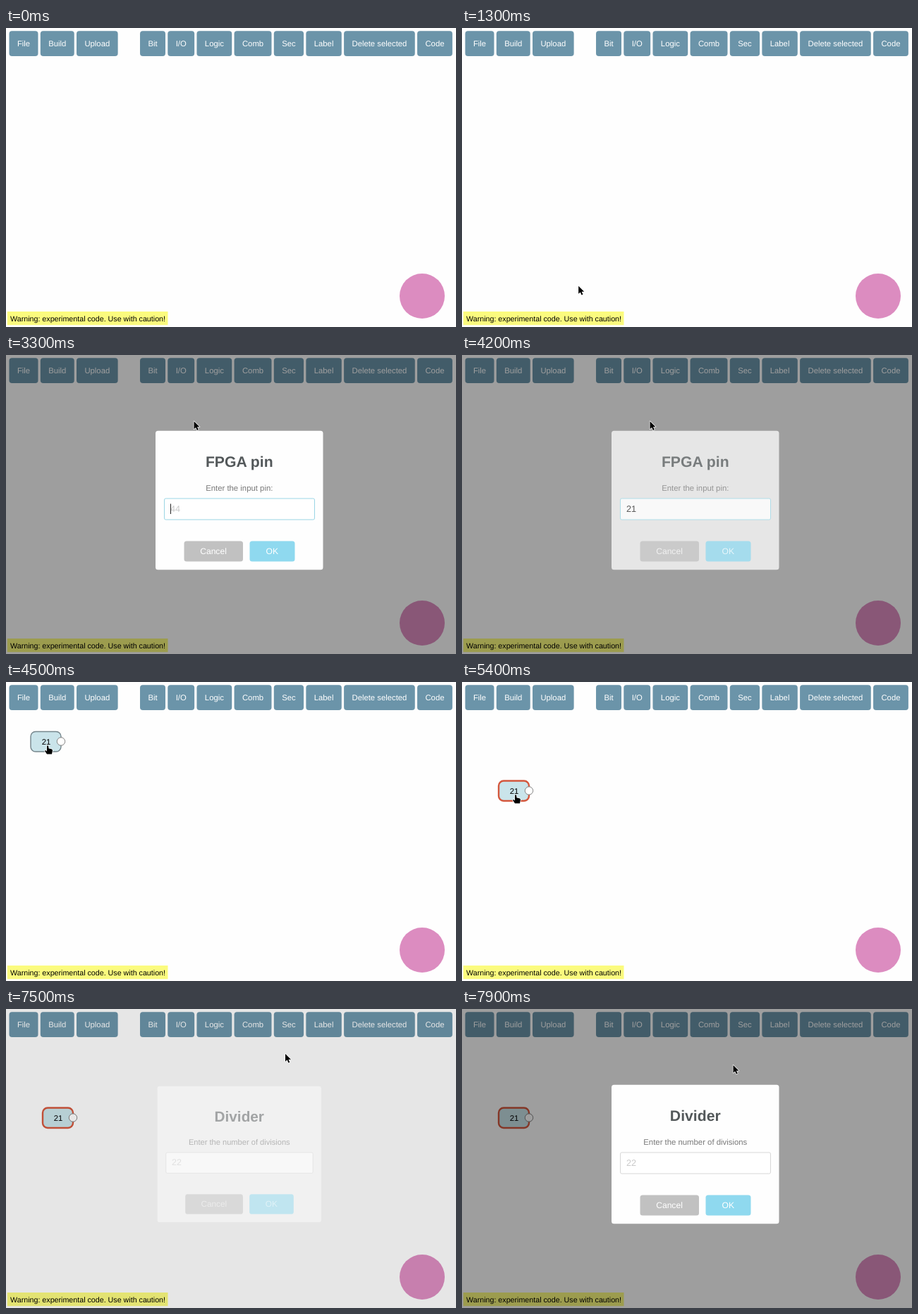
Recreate the animation shown at these times as an HTML page with a canvas. Size 638 by 425 pixels, loop 8 s.

```html
<!DOCTYPE html>
<html lang="en">
<head>
<meta charset="utf-8">
<title>Circuit editor</title>
<style>
html, body { margin: 0; width: 638px; height: 425px; overflow: hidden; background: #fefefe; }
canvas { display: block; }
</style>
</head>
<body>
<canvas id="stage" width="638" height="425"></canvas>
<script>
const ctx = document.getElementById('stage').getContext('2d');
const W = 638, H = 425, LOOP = 8000, STEP = 100;
const FONT = '"Liberation Sans", Arial, sans-serif';
const PAPER = '#fefefe', BLUE = '#6b94a9';
const SIZE = 11.3, PAD = 11.4, GAP = 3.3, ROW = 29.7;
const DRAG = { from: 4600, to: 5000, dx: 17, dy: 70 };

// Places where the pointer rests
const STOPS = [
  { arrive: 1100, leave: 1100, x: 150, y: 430 },
  { arrive: 1900, leave: 2100, x: 247, y: 25 },
  { arrive: 2400, leave: 2600, x: 252.5, y: 60.7 },
  { arrive: 3000, leave: 4200, x: 266.5, y: 94.3 },
  { arrive: 4500, leave: DRAG.from, x: 59, y: 90.5 },
  { arrive: DRAG.to, leave: 5700, x: 59 + DRAG.dx, y: 90.5 + DRAG.dy },
  { arrive: 6400, leave: 6400, x: 385.5, y: 96.5 },
  { arrive: 6800, leave: 6900, x: 399, y: 24 },
  { arrive: 7200, leave: 7400, x: 400, y: 58 },
  { arrive: 7700, leave: LOOP, x: 384.5, y: 79.7 }
];

const ramp = (t, a, b) => Math.max(0, Math.min(1, (t - a) / (b - a)));
const ease = u => u * u * (3 - 2 * u);
const mix = (a, b, u) => a + (b - a) * u;

function pointerAt(t) {
  const i = Math.max(1, STOPS.findIndex(s => s.arrive >= t));
  const b = t > STOPS.at(-1).arrive ? STOPS.at(-1) : STOPS[i];
  const a = STOPS[STOPS.indexOf(b) - 1];
  const u = ease(ramp(t, a.leave, b.arrive));
  return [mix(a.x, b.x, u), mix(a.y, b.y, u)];
}

function box(x, y, w, h, r, fill, stroke, line = 1) {
  ctx.beginPath();
  ctx.roundRect(x, y, w, h, r);
  ctx.fillStyle = fill;
  ctx.fill();
  if (stroke) { ctx.strokeStyle = stroke; ctx.lineWidth = line; ctx.stroke(); }
}

function disc(x, y, r, fill, stroke) {
  ctx.beginPath();
  ctx.arc(x, y, r, 0, Math.PI * 2);
  ctx.fillStyle = fill;
  ctx.fill();
  if (stroke) { ctx.strokeStyle = stroke; ctx.lineWidth = 1; ctx.stroke(); }
}

function setFont(size, weight = '') {
  ctx.font = `${weight} ${size}px ${FONT}`;
  ctx.textRendering = 'geometricPrecision';
}

function text(str, x, y, size, color, align = 'left', weight = '') {
  setFont(size, weight);
  ctx.textAlign = align;
  ctx.fillStyle = color;
  ctx.fillText(str, x, y);
}

// Buttons fit their labels; the open one sinks and drops its menu
function drawButtons(x, labels, menu) {
  for (const label of labels) {
    setFont(SIZE);
    const w = ctx.measureText(label).width + 2 * PAD;
    const open = menu && menu.owner === label;
    const dy = open ? 3.6 : 0;
    box(x, 4.2 + dy, w, 35.8, 4, BLUE);
    text(label, x + PAD, 25.6 + dy, SIZE, '#fff');
    if (open) menu.x = x;
    x += w + GAP;
  }
}

function drawMenu({ x, items, active }) {
  ctx.save();
  ctx.shadowColor = 'rgba(0,0,0,.28)';
  ctx.shadowBlur = 9;
  ctx.shadowOffsetY = 4;
  box(x, 44, 71.5, items.length * ROW, 0, PAPER);
  ctx.restore();
  items.forEach((item, i) => {
    const y = 44 + i * ROW;
    if (active && i === 0) box(x, y, 71.5, ROW, 0, '#f1f1f1');
    text(item, x + PAD, y + 18, 11.4, BLUE, 'left', 'bold');
  });
}

function menuAt(t) {
  if (t >= 1900 && t < 2700) return { owner: 'I/O', items: ['Input', 'Output'], active: t >= 2300 };
  if (t >= 6800 && t < 7400) return { owner: 'Sec', items: ['Divider'], active: t >= 7100 };
}

function drawBlock(t) {
  const u = ease(ramp(t, DRAG.from, DRAG.to)), picked = t >= DRAG.from;
  const x = 35 + DRAG.dx * u, y = 70.5 + DRAG.dy * u;
  box(x, y, 43, 28.5, 7, '#cae4ea', picked ? '#d4573d' : '#75868c', picked ? 2.4 : 1.4);
  disc(x + 43, y + 14, 5.7, '#fff', '#808080');
  text('21', x + 22, y + 18, SIZE, '#000', 'center');
}

// Overshoots, then settles at full size
const popScale = u => 1 - .3 * (1 - u) ** 2 * Math.cos(u * 5);

function drawDialog(d) {
  const cx = 330.75, cy = 206.5;
  ctx.save();
  ctx.globalAlpha = d.alpha;
  ctx.translate(cx, cy);
  ctx.scale(d.scale, d.scale);
  ctx.translate(-cx, -cy);
  box(212, 107.7, 237.5, 197.5, 3.5, PAPER);
  text(d.title, cx, 158.7, 21.2, '#53585a', 'center', 'bold');
  text(d.prompt, cx, 193, 11.35, '#797979', 'center');
  box(224.5, 204, 213, 30, 2, '#fff', d.focus ? '#9ad6e5' : '#d7d7d7');
  text(d.value || d.hint, 233, 222.8, 12.7, d.value ? '#222' : '#c9c9c9');
  if (d.caret) box(233 + 7.1 * d.value.length, 211.5, 1, 14.5, 0, '#222');
  box(252.5, 264.5, 83.5, 29, 3.5, '#c1c1c1');
  text('Cancel', 294, 283, 12.1, '#fff', 'center');
  box(345.5, 264.5, 64, 29, 3.5, '#8fd9ef');
  text('OK', 377.3, 283, 12.1, '#fff', 'center');
  ctx.restore();
}

function drawDialogs(t) {
  if (t >= 2800 && t < 4300) {
    drawDialog({
      title: 'FPGA pin', prompt: 'Enter the input pin:', hint: '44',
      value: '21'.slice(0, Math.max(0, Math.floor((t - 3400) / 200))),
      focus: t >= 3000, caret: t >= 3000 && t < 3800,
      scale: popScale(ramp(t, 2700, 3050)),
      alpha: ramp(t, 2700, 2900) * (t < 4200 ? 1 : .75)
    });
  }
  if (t >= 7500) {
    drawDialog({
      title: 'Divider', prompt: 'Enter the number of divisions', hint: '22', value: '',
      scale: popScale(ramp(t, 7400, 7750)),
      alpha: ramp(t, 7400, 7600)
    });
  }
}

const ARROW = new Path2D('M0 0V11L2.6 8.7 4.4 12.8 6.3 12 4.5 8H8Z');
const HAND = new Path2D('M-1 0H1L1.6 4 6 5 7 6.5 6 12H-1L-4 7.5-3 6.5-1 8Z');

function drawPointer(t) {
  const icon = t >= 4500 && t <= 5700 ? HAND : ARROW;
  ctx.save();
  ctx.translate(...pointerAt(t));
  ctx.lineJoin = 'round';
  ctx.strokeStyle = '#fff';
  ctx.lineWidth = 1.4;
  ctx.stroke(icon);
  ctx.fillStyle = '#000';
  ctx.fill(icon);
  ctx.restore();
}

function draw(t) {
  ctx.fillStyle = PAPER;
  ctx.fillRect(0, 0, W, H);

  const menu = menuAt(t);
  drawButtons(4.5, ['File', 'Build', 'Upload']);
  drawButtons(190, ['Bit', 'I/O', 'Logic', 'Comb', 'Sec', 'Label', 'Delete selected', 'Code'], menu);
  disc(590, 381, 32, '#dc8cc0');
  box(1.8, 403, 227.7, 19.3, 0, '#fbfb7e');
  text('Warning: experimental code. Use with caution!', 6, 416.6, 10.7, '#000');
  if (t >= 4300) drawBlock(t);
  if (menu) drawMenu(menu);

  const shade = ramp(t, 2600, 3000) - ramp(t, 4200, 4400) + ramp(t, 7400, 7800);
  ctx.fillStyle = `rgba(0,0,0,${.38 * shade})`;
  ctx.fillRect(0, 0, W, H);
  drawDialogs(t);
  drawPointer(t);
}

function tick() {
  const t = performance.now() % LOOP;
  draw(Math.floor(t / STEP) * STEP);
  requestAnimationFrame(tick);
}
tick();
</script>
</body>
</html>
```
